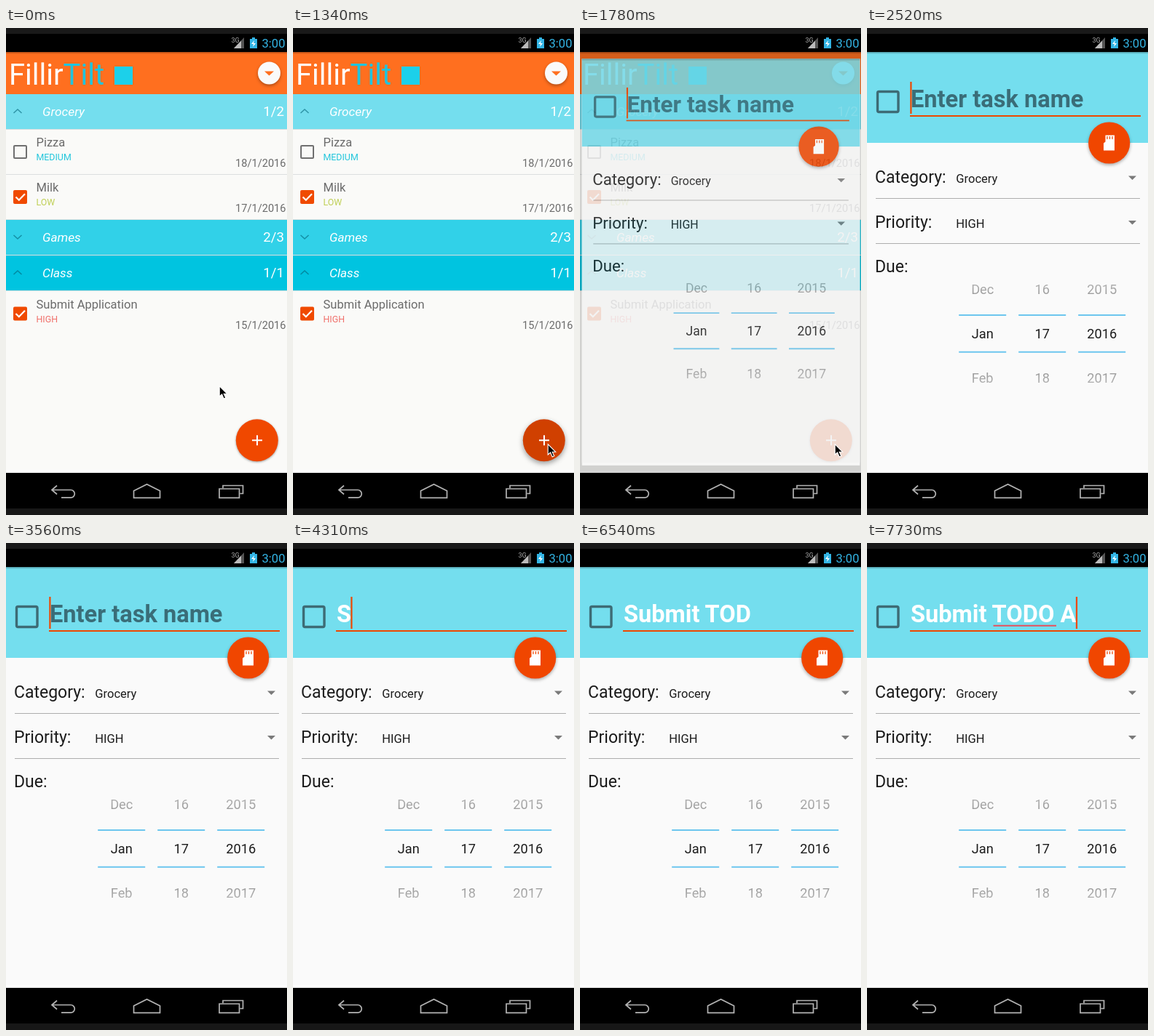
Write an HTML page that moves like this. It is 386x670 px and loops after 8 s.

```html
<!DOCTYPE html>
<html lang="en">
<head>
<meta charset="utf-8">
<title>Task list</title>
<style>
  html, body { margin: 0; height: 100%; overflow: hidden; background: #000; }
  svg { display: block; width: 386px; height: 670px; font-family: Roboto, "Noto Sans", sans-serif; }
  text { white-space: pre; }
  .head { font-size: 17.3px; font-style: italic; fill: #fff; }
  .count { font-size: 18.8px; fill: #fff; text-anchor: end; }
  .task { font-size: 16.5px; fill: #6b6b6b; }
  .level { font-size: 12.4px; }
  .date { font-size: 14.6px; fill: #6b6b6b; text-anchor: end; }
  .label { font-size: 23px; fill: #1c1c1c; }
  .value { font-size: 16.5px; fill: #1c1c1c; }
  .pick { font-size: 18.2px; fill: url(#fade); text-anchor: middle; }
  .name { font-size: 32.6px; font-weight: 700; }
  .line { fill: none; stroke: #b4b4b4; stroke-width: 1.7; }
  .fab { filter: drop-shadow(0 2px 2px rgba(0,0,0,.32)); }
</style>
</head>
<body>
<svg viewBox="0 0 386 670">
  <defs>
    <linearGradient id="fade" gradientUnits="userSpaceOnUse" x1="0" y1="340" x2="0" y2="502">
      <stop offset="0" stop-color="#c4c4c4"/>
      <stop offset=".22" stop-color="#8e8e8e"/>
      <stop offset=".4" stop-color="#1c1c1c"/>
      <stop offset=".6" stop-color="#1c1c1c"/>
      <stop offset=".78" stop-color="#8e8e8e"/>
      <stop offset="1" stop-color="#c8c8c8"/>
    </linearGradient>
    <linearGradient id="shade" x2="0" y2="1">
      <stop stop-opacity=".3"/><stop offset="1" stop-opacity="0"/>
    </linearGradient>
  </defs>

  <rect width="386" height="670"/>
  <rect width="386" height="8" fill="#191919"/>
  <rect y="661" width="386" height="9" fill="#171717"/>

  <!-- status bar -->
  <text x="309.5" y="20" font-size="9" fill="#aaa">3G</text>
  <path d="M327 13V28H313Z" fill="#555"/>
  <path d="M323 17.5V28H313Z" fill="#bbb"/>
  <path d="M338 13h4v2h3v13h-10v-13h3z" fill="#33b5e5"/>
  <path d="M341 17l-4 5h3l-1 4 4-5h-3z" fill="#fff"/>
  <text x="351.5" y="27" font-size="16.6" fill="#33b5e5">3:00</text>

  <!-- navigation bar -->
  <path class="line" d="M70 629.5l-7 6 7 6M63 635.5h26a5.3 5.3 0 0 1 0 10.6h-13M175.500 646.300v-9.500l18-9 18 9v9.500zM298 633v-3.500h27.500v11h-4M293 634h27.500v12.300h-27.500z"/>

  <!-- list screen -->
  <rect y="33" width="386" height="579" fill="#fff"/>
  <rect y="33" width="386" height="575" fill="#fafaf8"/>
  <rect y="33" width="386" height="58" fill="#ff6f1f"/>
  <rect y="33" width="386" height="3" fill="url(#shade)"/>
  <text x="4" y="78" font-size="40" fill="#fff">Fillir<tspan fill="#1fc4de">Tilt</tspan></text>
  <rect x="149" y="53" width="25" height="25" fill="#1cd0ea"/>
  <g class="fab"><circle cx="361.500" cy="62" r="15.500" fill="#fafafa"/></g>
  <path d="M355 59.500h13l-6.500 6z" fill="#ff6f1f"/>
  <g id="list"></g>
  <g id="add">
    <circle id="disc" cx="344.800" cy="567.300" r="29"/>
    <path d="M338 567.300h14M345 560.300v14" stroke="#fff" stroke-width="2"/>
  </g>
  <rect id="dim" y="33" width="386" height="579" opacity=".165"/>

  <!-- new task screen -->
  <g id="card">
    <rect x="-4" y="33" width="395" height="579" fill="#fff"/>
    <rect x="-4" y="33" width="395" height="575" fill="#fafafa"/>
    <rect x="-4" y="33" width="395" height="125" fill="#74deee"/>
    <rect x="-4" y="33" width="395" height="3" fill="url(#shade)"/>
    <rect x="14.500" y="87.500" width="28.500" height="28" rx="2" fill="none" stroke="#3d6b75" stroke-width="3.400"/>
    <text id="name" class="name" x="60" y="109"></text>
    <path id="spell" d="M173.500 113.700H260" stroke="#e8505c" stroke-width="2"/>
    <path d="M59 121H376" stroke="#ee4800" stroke-width="2"/>
    <rect id="caret" y="74" width="2.200" height="44" fill="#ee4800"/>
    <g class="fab"><circle cx="332.700" cy="158" r="28.600" fill="#f04600"/></g>
    <path d="M327.500 147.500h12.500v21h-15v-10l2.500-2z" fill="#fff"/>
    <path d="M330 149v4M333.500 149v4M337 149v4" stroke="#f04600" stroke-width="1.200"/>
    <text class="label" x="11" y="213">Category:</text>
    <text class="label" x="11" y="275">Priority:</text>
    <text class="label" x="11" y="336">Due:</text>
    <text class="value" x="122.300" y="213">Grocery</text>
    <text class="value" x="122.300" y="274.500">HIGH</text>
    <path d="M359 203.500h11l-5.500 5.500zM359 265h11l-5.500 5.500z" fill="#7a7a7a"/>
    <path d="M12 234.500H375M12 296.500H375" stroke="#adadad"/>
    <g id="picker"></g>
  </g>

  <path id="cursor" d="M0 0V14.500L3.400 11.500 6 17.500 8.600 16.300 6 10.700H10.500Z" stroke="#fff" stroke-width="1.100"/>
</svg>
<script>
const $ = id => document.getElementById(id);
const text = (cls, x, y, s, fill) =>
  `<text class="${cls}" x="${x}" y="${y}"${fill ? ` style="fill:${fill}"` : ''}>${s}</text>`;

function header(y, color, label, count, open) {
  const d = open ? 'l5.500 -5 5.500 5' : 'm0 -5l5.500 5 5.500 -5';
  return `<rect y="${y}" width="386" height="48" fill="${color}"/>` +
    `<path d="M10.500 ${y + 26}${d}" fill="none" stroke="#006478" stroke-opacity=".6" stroke-width="1.500"/>` +
    text('head', 50, y + 30, label) + text('count', 382, y + 30, count);
}

function task(y, label, level, color, date, done) {
  const box = done
    ? `<rect x="10" y="${y + 22}" width="19" height="19" rx="2" fill="#f04a00"/>
       <path d="M13.500 ${y + 31.5}l4.300 4.300 8.200 -8.500" fill="none" stroke="#fff" stroke-width="2.200"/>`
    : `<rect x="11" y="${y + 23}" width="17" height="17" rx="1" fill="none" stroke="#707070" stroke-width="2"/>`;
  return box + text('task', 41.5, y + 24, label) + text('level', 41.5, y + 43, level, color) +
    text('date', 384.5, y + 52, date);
}

$('list').innerHTML =
  header(91, '#74deee', 'Grocery', '1/2', true) +
  task(139, 'Pizza', 'MEDIUM', '#22c6dc', '18/1/2016', false) +
  task(201, 'Milk', 'LOW', '#bfcf55', '17/1/2016', true) +
  header(264, '#31d1e8', 'Games', '2/3', false) +
  header(313, '#00c4e0', 'Class', '1/1', true) +
  task(361.5, 'Submit Application', 'HIGH', '#f0716c', '15/1/2016', true) +
  '<path d="M0 139.500h386M0 201.500h386M0 263.500h386M0 312.500h386M0 361.500h386" stroke="#dcdfdf"/>';

const wheels = [['Dec', 'Jan', 'Feb'], [16, 17, 18], [2015, 2016, 2017]];
$('picker').innerHTML = wheels.map((items, i) => {
  const x = 158.7 + 82 * i;
  return items.map((s, j) => text('pick', x, 366 + 61.2 * j, s)).join('') +
    `<path d="M${x - 32.5} 395h65m0 50.800h-65" fill="none" stroke="#6cc6ee" stroke-width="2"/>`;
}).join('');

const TICK = 147;
const typed = [
  [4310, 'S'], [4600, 'Su'], [4750, 'Sub'], [5200, 'Subm'], [5340, 'Submit'], [5490, 'Submit '],
  [5640, 'Submit T'], [5790, 'Submit TO'], [5940, 'Submit TOD'], [6690, 'Submit TODO'],
  [6990, 'Submit TODO '], [7430, 'Submit TODO a'], [7730, 'Submit TODO A']
];
const caretOff = [[3120, 3560], [4160, 4310], [6540, 6690]];
const clamp = v => Math.max(0, Math.min(1, v));
const show = (id, on) => $(id).style.display = on ? '' : 'none';
// whole screen ticks since a start time
const ticks = (t, start) => Math.floor((t - start) / TICK + 0.1);

function draw(t) {
  // pointer glides to the button
  const m = clamp((ticks(t, 150) + 1) / 4), ease = m * m * (3 - 2 * m);
  $('cursor').setAttribute('transform', `translate(${293.2 + 57 * ease} ${492.5 + 80 * ease})`);
  show('cursor', t < 2220);

  // button press
  const press = t < 1190 || t >= 1640 ? 0 : t < 1340 ? 0.5 : 1;
  $('disc').setAttribute('fill', `rgb(${240 - 32 * press},${72 - 8 * press},0)`);
  $('add').style.filter =
    `drop-shadow(0 ${1 + 2.5 * press}px ${1.8 + 2 * press}px rgba(0,0,0,.38))`;

  // new screen fades and grows in
  const open = t >= 1640;
  show('card', open);
  show('dim', open);
  const left = (1 - clamp(ticks(t, 1640) / 4)) ** 3, scale = 1 - 0.08 * left;
  $('card').setAttribute('opacity', 1 - 0.4 * left);
  $('card').setAttribute('transform',
    `translate(195 309) scale(${scale}) translate(-195 -309)`);

  // typing
  const entry = typed.filter(e => e[0] <= t).pop();
  const name = $('name');
  name.textContent = entry ? entry[1] : 'Enter task name';
  name.setAttribute('fill', entry ? '#fff' : '#3a6d78');
  show('spell', t >= 6990);
  const end = entry && open ? name.getComputedTextLength() : 0;
  $('caret').setAttribute('x', 59.3 + end);
  show('caret', !caretOff.some(([a, b]) => t >= a && t < b));
}

function frame() {
  draw(performance.now() % 8000);
  requestAnimationFrame(frame);
}
frame();
</script>
</body>
</html>
```
